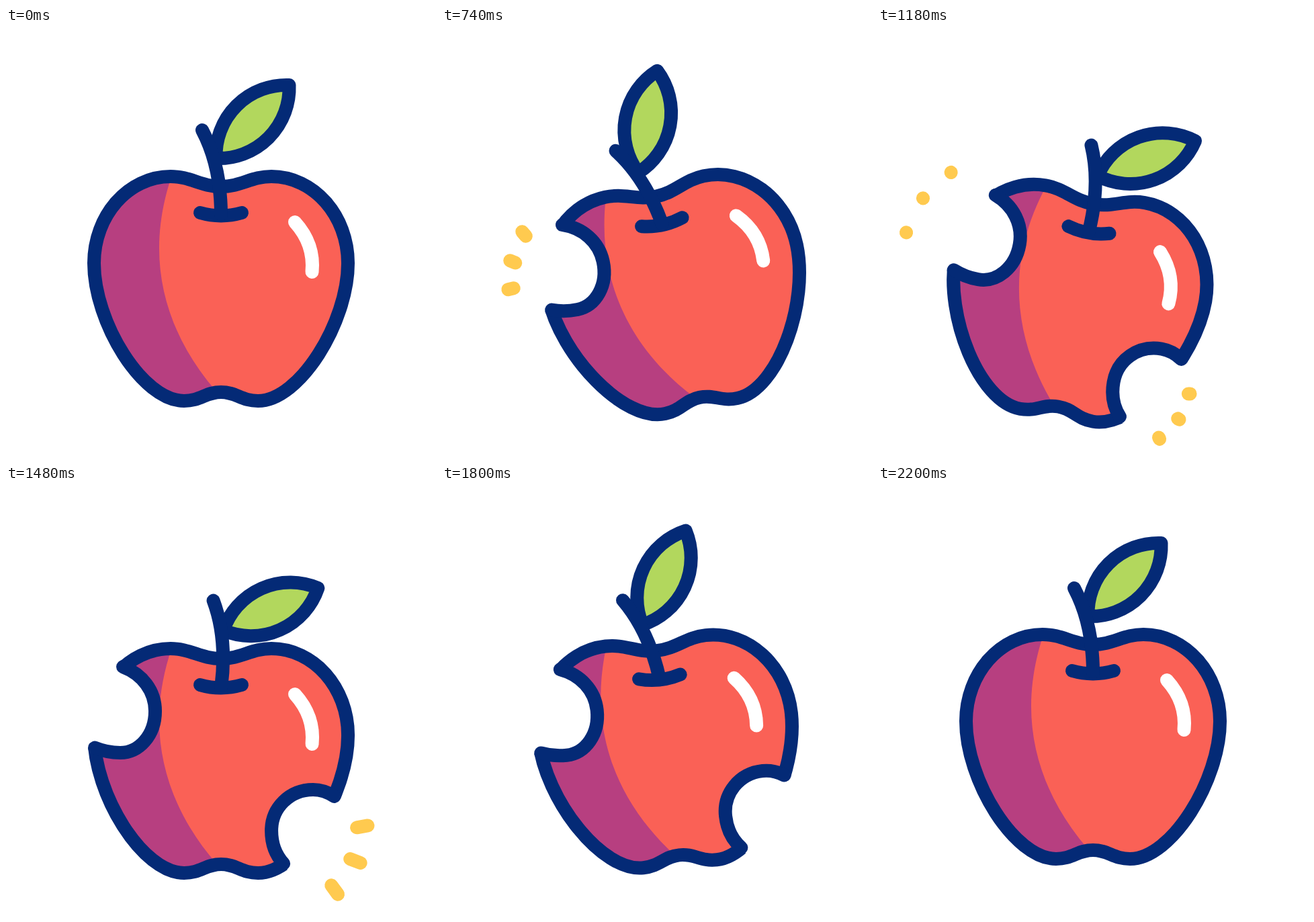
Animation of 640x640 px, one loop 2.4 s. Source, as an HTML page:

```html
<!DOCTYPE html>
<html lang="en">
<head>
<meta charset="utf-8">
<title>Apple</title>
<style>
  html, body { margin: 0; width: 100%; height: 100%; overflow: hidden; background: #fff; }
  svg { display: block; width: 100vw; height: 100vh; }
  .line { fill: none; stroke: #042a76; stroke-width: 20; stroke-linecap: round; stroke-linejoin: round; }
  .crumb { stroke: #ffca4f; stroke-width: 20; stroke-linecap: round; }
</style>
</head>
<body>
<svg viewBox="0 0 640 640">
  <defs>
    <path id="body" d="M320 236C290 236 275 221 245 221C182 221 131 279 131 350C131 438 203 555 265 555C290 555 297 542 320 542C343 542 350 555 375 555C437 555 509 438 509 350C509 279 458 221 395 221C365 221 350 236 320 236Z"/>
    <clipPath id="inside"><use href="#body"/></clipPath>
  </defs>
  <g id="apple">
    <use href="#body" fill="#fa6156"/>
    <path clip-path="url(#inside)" fill="#b73f80" d="M246 222C234 258 228 293 228 328C228 402 256 476 314 542V580H100V200H246Z"/>
    <use href="#body" class="line"/>
    <path d="M430 289C450 311 458 337 455.500 363" fill="none" stroke="#fff" stroke-width="20" stroke-linecap="round"/>
    <g id="bites"></g>
    <path class="line" d="M289 275Q320 284 351 275"/>
    <g id="stem">
      <g id="leaf">
        <path class="line" style="fill:#b2d75d" d="M312.500 194A105 105 0 0 1 421.500 85A105 105 0 0 1 312.500 194Z"/>
      </g>
      <path class="line" d="M292 152Q320 205 320 278"/>
    </g>
    <g id="crumbs"></g>
  </g>
</svg>
<script>
const LOOP = 2400, STEP = 20;
const $ = id => document.getElementById(id);

// Each track is a list of [time, value], eased between neighbours.
const tracks = {
  drop: [[200, 0], [1200, 26], [2200, 0]],
  tilt: [[200, 0], [700, -12.5], [1200, 10], [1700, -7], [2200, 0]],
  stem: [[200, 0], [800, -8], [1380, 9], [1900, -8], [2200, 0]],
  leaf: [[200, 0], [800, -15], [1340, 18], [1900, -10], [2200, 0]]
};

// Crumbs are [x1, y1, x2, y2]; start is when the first crumb dot shows.
const bites = [
  {
    start: 580, centre: [139.5, 303], outside: "L62 376L120 190Z",
    arc: "M174 248C203 259 222 284 222 314C222 350 198 376 170 376C155 376 143 373 132 368.5",
    crumbs: [[117.6, 253, 103, 226], [94, 288.7, 68.5, 271], [83.7, 325, 52.7, 325.6]]
  },
  {
    start: 1100, centre: [457, 499], outside: "L451 600L553 468Z",
    arc: "M488.5 441C478 434 468 431 457 431C422 431 395 458 395 492C395 510 401 528 413 541",
    crumbs: [[507.6, 490, 541, 484], [498.5, 529, 530, 541], [475.5, 561.5, 495.5, 589]]
  }
];

function ease(t, from, to) {
  const s = Math.min(1, Math.max(0, (t - from) / (to - from)));
  return s * s * (3 - 2 * s);
}

function valueAt(track, t) {
  let value = track[0][1];
  for (let i = 1; i < track.length; i++) {
    const [t0, a] = track[i - 1], [t1, b] = track[i];
    value += (b - a) * ease(t, t0, t1);
  }
  return value;
}

function add(parent, tag, attrs = {}) {
  const el = document.createElementNS("http://www.w3.org/2000/svg", tag);
  for (const name in attrs) el.setAttribute(name, attrs[name]);
  return parent.appendChild(el);
}

for (const bite of bites) {
  bite.group = add($("bites"), "g");
  add(bite.group, "path", { d: bite.arc + bite.outside, fill: "#fff" });
  bite.edge = add(bite.group, "path", { d: bite.arc, class: "line" });
  bite.lines = bite.crumbs.map(() => add($("crumbs"), "line", { class: "crumb" }));
}

function show(el, on) {
  el.setAttribute("visibility", on ? "visible" : "hidden");
}

function drawBite(bite, t) {
  const size = ease(t, bite.start - 50, bite.start + 60) * (1 - ease(t, 1820, 2140));
  const [x, y] = bite.centre;
  show(bite.group, size > 0.02);
  if (size > 0.02) {
    bite.group.setAttribute("transform", `translate(${x} ${y}) scale(${size}) translate(${-x} ${-y})`);
    bite.edge.style.strokeWidth = 20 / size;
  }

  const age = t - bite.start;
  const head = ease(age, 0, 460), tail = ease(age, 180, 620);
  bite.lines.forEach((line, i) => {
    const [x1, y1, x2, y2] = bite.crumbs[i];
    show(line, age >= 0 && age <= 640);
    line.setAttribute("x1", x1 + (x2 - x1) * tail);
    line.setAttribute("y1", y1 + (y2 - y1) * tail);
    // A hair of length keeps the round caps painted as a dot.
    line.setAttribute("x2", x1 + (x2 - x1) * head + 0.01);
    line.setAttribute("y2", y1 + (y2 - y1) * head);
  });
}

function draw(now) {
  const t = Math.floor((now % LOOP) / STEP) * STEP;
  const at = name => valueAt(tracks[name], t);
  $("apple").setAttribute("transform", `translate(0 ${at("drop")}) rotate(${at("tilt")} 320 240)`);
  $("stem").setAttribute("transform", `rotate(${at("stem")} 320 280)`);
  $("leaf").setAttribute("transform", `rotate(${at("leaf")} 312.5 194)`);
  bites.forEach(bite => drawBite(bite, t));
}

const begin = performance.now();
function tick() {
  draw(performance.now() - begin);
  requestAnimationFrame(tick);
}
tick();
</script>
</body>
</html>
```
